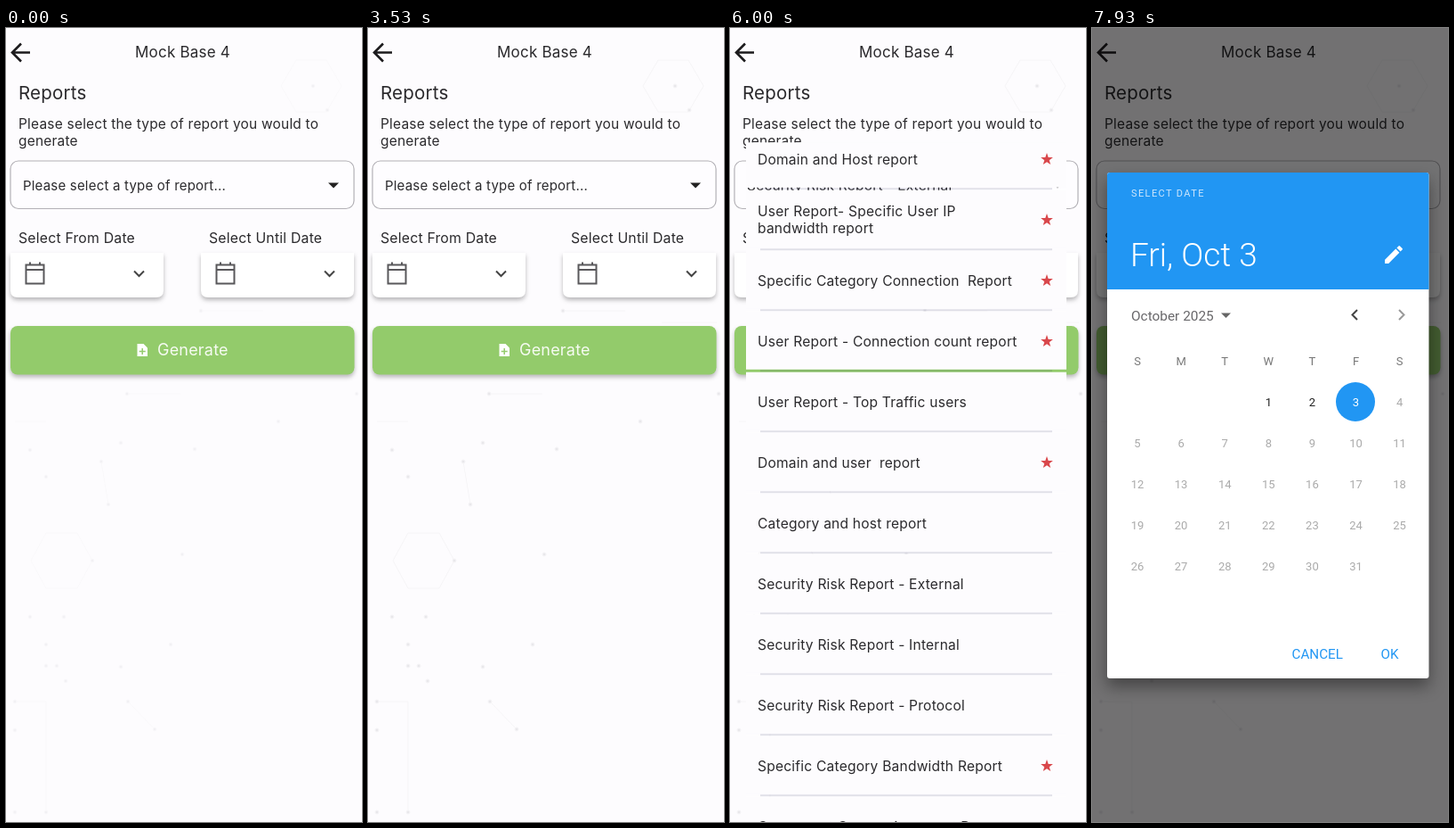
Animation of 400 by 890 pixels, one loop 8 s. Source, as an HTML page:

```html
<!DOCTYPE html>
<html lang="en">
<head>
<meta charset="utf-8">
<title>Report form</title>
<style>
  html, body { margin: 0; width: 100%; height: 100%; overflow: hidden; background: #fdfcfe; }
  svg { display: block; width: 400px; height: 890px; }
  text { font: 15.6px Inter, sans-serif; letter-spacing: .2px; fill: #2b2a2d; white-space: pre; }
  .line { fill: none; stroke: #444; stroke-width: 2; }
  .card { filter: drop-shadow(0 3px 2.5px rgba(0, 0, 0, .27)); }
  .mid { text-anchor: middle; }
  #picker text { font-family: Roboto, sans-serif; letter-spacing: 0; }
  #picker .day { font-size: 13px; text-anchor: middle; }
  #picker .blue { fill: #2196f3; font-size: 15.2px; }
</style>
</head>
<body>
<svg viewBox="0 0 400 890">
  <rect width="400" height="890" fill="#fdfcfe"/>
  <g id="net" fill="#e9e8eb" stroke="#f6f5f7">
    <path fill="none" d="M28 597l17-31h35l17 31-17 31h-35zM309 65l17-29h34l17 29-17 29h-34zM10 441h35M10 755h35v124M107 486l8 48M137 755l30 31M219 317h70M330 330h62M136 410h60"/>
  </g>
  <g class="line" style="stroke:#1c1b1d;stroke-width:2.6"><path d="M27 27.500H7M17 17.500l-10 10 10 10"/></g>
  <text class="mid" x="198.500" y="33" style="font-size:17px">Mock Base 4</text>
  <text x="14" y="79.500" style="font-size:20.500px">Reports</text>
  <text x="14" y="113" style="font-size:15.500px">Please select the type of report you would to</text>
  <text x="14" y="132" style="font-size:15.500px">generate</text>
  <rect x="5" y="149" width="386" height="53.500" rx="9" fill="#fefdff" stroke="#b3b1b6" stroke-width="1.200"/>
  <text id="choice" x="19" y="181.500"></text>
  <path d="M362 173.500h12l-6 6z" fill="#222"/>
  <g id="dates"></g>
  <rect class="card" x="5" y="334" width="386.500" height="54.500" rx="8" fill="#93cb6b"/>
  <path d="M147.500 354h7l4.500 4.500v9.500h-11.500z" fill="#fff"/>
  <path d="M153.200 359v7M149.700 362.500h7" stroke="#93cb6b" stroke-width="1.500"/>
  <text x="170" y="366.500" style="font-size:18px;fill:#f6fbf2">Generate</text>
  <ellipse id="ball" cx="198" fill="#93cb6b"/>
  <g id="list"></g>
  <rect id="dim" width="400" height="890"/>
  <g id="picker">
    <rect x="17" y="162" width="361.500" height="567" rx="3" fill="#fff" style="filter:drop-shadow(0 9px 9px rgba(0,0,0,.4))"/>
    <path d="M17 293V165q0-3 3-3h355.500q3 0 3 3v128z" fill="#2196f3"/>
    <text x="44" y="189" style="font-size:11px;letter-spacing:1.400px;fill:#cfe7fc">SELECT DATE</text>
    <text x="43" y="267" style="font-size:37px;font-weight:300;fill:#fff">Fri, Oct 3</text>
    <path transform="translate(325.800 240.800) scale(1.100)" fill="#fff" d="M3 17.250V21h3.750L17.810 9.940l-3.750-3.750zM20.710 7.040a1 1 0 0 0 0-1.410l-2.340-2.340a1 1 0 0 0-1.410 0l-1.830 1.830 3.750 3.750z"/>
    <text x="44" y="327.500" style="font-size:15.400px;fill:#68676a">October 2025</text>
    <path d="M145 319.500h11l-5.500 5.500z" fill="#666"/>
    <path class="line" d="M298 316l-5.500 5.500 5.500 5.500"/>
    <path class="line" style="stroke:#999" d="M345 316l5.500 5.500-5.500 5.500"/>
    <circle cx="296" cy="419" r="22" fill="#2196f3"/>
    <g id="days"></g>
    <text class="blue" x="224.500" y="707">CANCEL</text>
    <text class="blue" x="324.500" y="707">OK</text>
  </g>
</svg>
<script>
const $ = id => document.getElementById(id);
const clamp = v => Math.min(1, Math.max(0, v));
const easeInOut = p => p < .5 ? 4 * p ** 3 : 1 - 4 * (1 - p) ** 3;
const progress = (t, from, to) => clamp((t - from) / (to - from));

// Faint background dots
const dots = [27,473, 45,503, 107,486, 115,534, 129,465, 136,410, 212,472, 306,441, 394,410, 97,597,
  198,590, 65,660, 27,660, 45,691, 185,691, 45,715, 57,715, 67,732, 129,716, 10,755, 137,755,
  167,786, 10,787, 10,879, 45,879, 345,65, 361,92, 219,317];
for (let i = 0; i < dots.length; i += 2)
  $('net').innerHTML += `<circle cx="${dots[i]}" cy="${dots[i + 1]}" r="2"/>`;

// Date fields
const dateField = (x, label) => `
  <text x="${x + 9}" y="240.500" style="font-size:15.800px">${label}</text>
  <path class="card" fill="#fff" d="M${x} 252h172v42q0 8-8 8h-156q-8 0-8-8z"/>
  <path class="line" style="stroke:#59585b" d="M${x + 17.5} 265.500h20v21h-20zM${x + 17.5} 271h20M${x + 22} 262.500v3M${x + 33} 262.500v3"/>
  <path class="line" d="M${x + 139} 272.500l5.500 5.500 5.500-5.500"/>`;
$('dates').innerHTML = dateField(5, 'Select From Date') + dateField(219, 'Select Until Date');

// Report list: separate opaque rows, the page shows through the gaps; * marks a starred row
const reports = ['Domain and Host report*', 'User Report- Specific User IP|bandwidth report*',
  'Specific Category Connection  Report*', 'User Report - Connection count report*',
  'User Report - Top Traffic users', 'Domain and user  report*', 'Category and host report',
  'Security Risk Report - External', 'Security Risk Report - Internal',
  'Security Risk Report - Protocol', 'Specific Category Bandwidth Report*',
  'Concurrent Connection count Report'];
const star = Array.from({ length: 10 }, (_, i) => {
  const r = i % 2 ? 2.9 : 7.2, a = i * Math.PI / 5;
  return [r * Math.sin(a), -r * Math.cos(a)].map(v => v.toFixed(2));
}).join(' ');
$('list').innerHTML = reports.map((report, i) => {
  const y = 132 + 68 * i, top = i ? y - 33.5 : 113;
  const lines = report.replace('*', '').split('|');
  return `<rect x="18" y="${top}" width="360" height="${y + 31.5 - top}" fill="#fdfcfe"/>
    <rect x="34" y="${y + 32}" width="328" height="2" fill="#336" opacity=".14"/>` +
    lines.map((s, n) => `<text x="31" y="${y + 5.5 + 19 * (n - (lines.length - 1) / 2)}">${s}</text>`).join('') +
    (report.endsWith('*') ? `<polygon transform="translate(356 ${y})" points="${star}" fill="#d9474b"/>` : '');
}).join('');

// Calendar
const dayText = (col, y, s, color) =>
  `<text class="day" x="${51 + 49.1 * col}" y="${y + 4.5}" style="fill:${color}">${s}</text>`;
$('days').innerHTML = [...'SMTWTFS'].map((s, i) => dayText(i, 373, s, '#777')).join('') +
  Array.from({ length: 31 }, (_, i) => dayText((i + 3) % 7, 419 + 46 * Math.floor((i + 3) / 7),
    i + 1, i < 2 ? '#222' : i == 2 ? '#fff' : '#aaa')).join('');

function draw(t) {
  $('net').setAttribute('opacity', .5 + .5 * progress(t, 0, 870));

  const chosen = t >= 5870;
  $('choice').textContent = chosen ? 'Security Risk Report - External' : 'Please select a type of report...';
  $('choice').style.fontSize = chosen ? '15.5px' : '15px';

  // Loading ball, flattened slightly where it lands
  const bounce = ((t - 1670 + 800) % 800) / 800;
  const height = 4 * bounce * (1 - bounce);
  const ball = $('ball');
  ball.style.display = t >= 1530 && t < 2730 ? '' : 'none';
  ball.setAttribute('cy', 576 - 84 * height);
  ball.setAttribute('rx', 27.5);
  ball.setAttribute('ry', 26 + 1.5 * clamp(height * 3));

  // List slides in from below and out again
  const hidden = 1 - easeInOut(progress(t, 3480, 4050)) + easeInOut(progress(t, 5946, 6270));
  $('list').style.display = hidden < 1 ? '' : 'none';
  $('list').setAttribute('transform', `translate(0 ${780 * hidden})`);

  const open = progress(t, 7450, 7720), eased = 1 - (1 - open) ** 3, scale = .92 + .08 * eased;
  $('dim').setAttribute('opacity', .55 * open);
  $('picker').setAttribute('opacity', open);
  $('picker').setAttribute('transform', `translate(198 445) scale(${scale}) translate(-198 -445)`);
}

function frame() {
  draw(performance.now() % 8000);
  requestAnimationFrame(frame);
}
frame();
</script>
</body>
</html>
```
